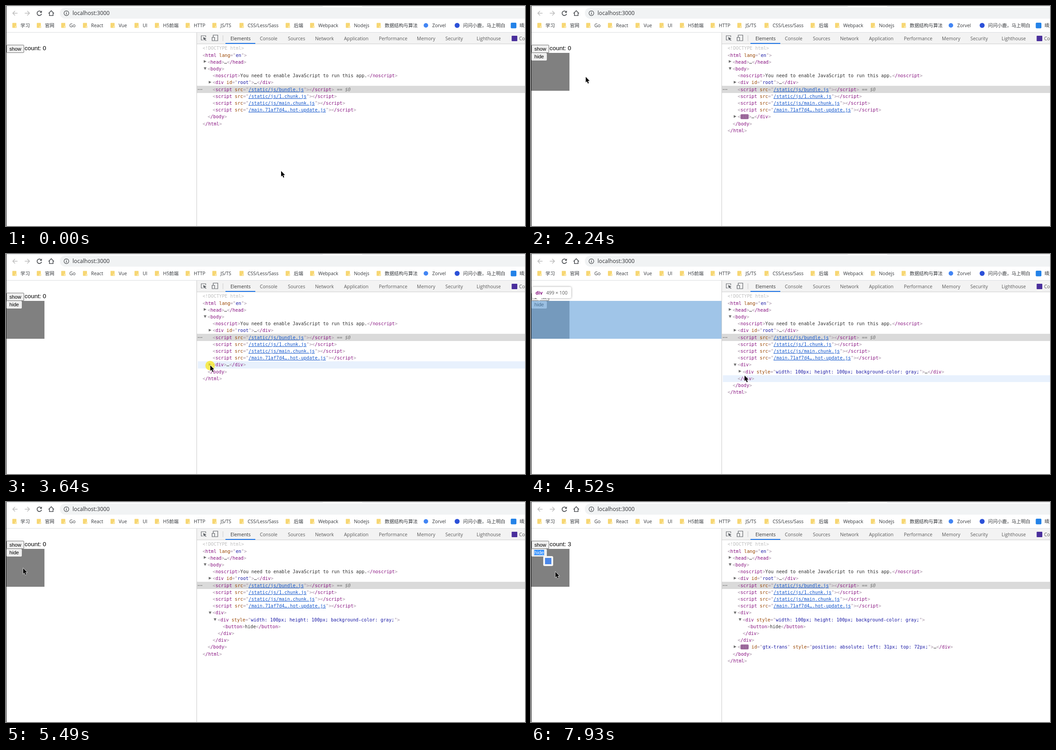
These frames come from a looping animation (1147 by 488 pixels, 8 s). An HTML page:

```html
<!DOCTYPE html>
<html lang="en">
<head>
<meta charset="utf-8">
<title>Portal demo</title>
<style>
html, body { margin: 0; width: 100%; height: 100%; overflow: hidden; background: #fff; }
#stage { position: relative; width: 1147px; height: 488px; overflow: hidden; background: #fff; }
#stage > *, .row, .row > *, #tip > i { position: absolute; }
#chrome { left: 0; top: 0; font: 10.4px "Open Sans", "Noto Sans CJK SC", "Noto Sans CJK", sans-serif; }

#count { left: 41px; top: 86px; font: 13.44px/16px "Liberation Sans", sans-serif; }
#square { left: 1px; top: 103.5px; width: 84px; height: 84px; background: #808080; }
.button { left: 1px; box-sizing: border-box; text-align: center; background: #efefef; color: #000;
  border: 1px solid #767676; border-radius: 2px; font: 11.2px/15px "Liberation Sans", sans-serif; }
#show { top: 86px; width: 39px; height: 18px; line-height: 16px; }
#hide { top: 104px; width: 34px; height: 17px; border-color: #efefef; }
#hide.selected span { background: #3390ff; color: #fff; }
#badge { left: 27px; top: 120px; width: 22px; height: 22px; background: #f5f5f5; border-radius: 3px; }
#badge::before { content: ""; position: absolute; inset: 4px; background: #4a86e8; }

#margin { left: 1px; top: 59px; width: 420px; height: 27px; background: rgba(246,178,107,.66); }
#content { left: 1px; background: rgba(111,168,220,.66); }
#tip { left: 2px; height: 25px; padding: 0 8px; background: #fff; border-radius: 3px; white-space: pre;
  box-shadow: 0 0 4px rgba(0,0,0,.4); font: 10.4px/26px "Open Sans", sans-serif; color: #5a5a5a; }
#tip b { color: #881280; margin-right: 8px; }
#tip > i { left: 10px; border: 6px solid transparent; }
#tip.below > i { top: -12px; border-bottom-color: #fff; }
#tip.above > i { top: 25px; border-top-color: #fff; }

#tree { left: 422px; top: 86.4px; width: 725px; white-space: pre;
  font: 10.13px/15.2px "DejaVu Sans Mono", monospace; color: #a894a6; }
.row { left: 2px; right: 0; height: 15.2px; }
.row.hover { background: #e8f1fd; }
.row.selected { left: 0; background: #dadada; margin-top: -1px; padding-top: 1px; height: 15px; }
.t { color: #881280; }
.n { color: #994500; }
.v { color: #1a1aa6; }
.l { color: #1155cc; text-decoration: underline; }
.x { color: #303030; }
.d { color: #c0c0c0; }
.eq { color: #777; font-style: italic; }
#flash { border-radius: 2px; }
.arrow { border: 3.5px solid transparent; }
.closed { border-left: 6px solid #6e6e6e; border-right: 0; top: 3.6px; }
.opened { border-top: 6px solid #6e6e6e; border-bottom: 0; top: 4.4px; }

#halo { width: 21px; height: 21px; margin: -10px 0 0 -11px; border-radius: 50%; background: rgba(250,232,20,.72); }
#cursor { left: -.3px; top: -.3px; overflow: visible; }
</style>
</head>
<body>
<div id="stage">
  <div id="count"></div>
  <div id="square"></div>
  <div id="show" class="button">show</div>
  <div id="hide" class="button"><span>hide</span></div>
  <div id="badge"></div>
  <div id="margin"></div>
  <div id="content"></div>
  <div id="tip"><i></i><b></b><span></span></div>
  <svg id="chrome" width="1147" height="488"></svg>
  <div id="tree"></div>
  <div id="halo"></div>
  <svg id="cursor" width="10" height="16"><path d="M0 0V12.2L2.7 9.8 4.8 14.8 6.9 13.8 4.8 9H8.6Z" stroke="#fff" stroke-width="1.2" paint-order="stroke"/></svg>
</div>
<script>
const $ = id => document.getElementById(id);
const LOOP = 8000;

// ---- browser chrome ----
const rect = (x, y, w, h, fill, more = '') => `<rect x="${x}" y="${y}" width="${w}" height="${h}" fill="${fill}" ${more}/>`;
const stroke = (d, color, width = 1.5) => `<path d="${d}" fill="none" stroke="${color}" stroke-width="${width}"/>`;
const label = (x, y, text, fill, more = '') => `<text x="${x}" y="${y}" fill="${fill}" ${more}>${text}</text>`;
const folder = x => rect(x + 1, 37.5, 9, 11, '#f7d774', 'rx="1"') + rect(x + 7, 44, 4, 4.5, '#fbe7a6');

const folders = [[13, '学习'], [67, '官网'], [121, 'Go'], [169, 'React'], [230, 'Vue'], [283, 'UI'],
  [328, 'H5前端'], [396, 'HTTP'], [455, 'JS/TS'], [515, 'CSS/Less/Sass'], [617, '后端'],
  [671, 'Webpack'], [750, 'Nodejs'], [818, '数据结构与算法']];
const sites = [[942, 'Zorvel'], [1010, '问问小鹿，马上明白'], [1135, '晴天']];
const tabs = [[496, 'Elements'], [561, 'Console'], [623, 'Sources'], [683, 'Network'], [747, 'Application'],
  [824, 'Performance'], [908, 'Memory'], [971, 'Security'], [1040, 'Lighthouse'], [1134, 'Components']];

$('chrome').innerHTML = [
  rect(0, 0, 700, 1, '#dcdfe3'), rect(787, 0, 360, 1, '#dcdfe3'),
  rect(119, 3.5, 1060, 24.5, '#f1f3f4', 'rx="12"'),
  stroke('M25.5 16H15M20 11l-5 5 5 5', '#bdbdbd'),
  stroke('M41.5 16H52M47 11l5 5-5 5', '#bdbdbd'),
  stroke('M77.5 12.8A5 5 0 1 0 78.6 17.2', '#505357', 1.7),
  '<path d="M79.3 10v5h-5z" fill="#505357"/>',
  stroke('M94 16.5l6-6 6 6M96 15v6.3h8V15', '#505357', 1.6),
  '<circle cx="133.5" cy="16" r="5.3" fill="none" stroke="#505357" stroke-width="1.2"/>',
  rect(132.8, 15, 1.4, 4, '#505357'), rect(132.8, 12.6, 1.4, 1.4, '#505357'),
  label(147, 20.2, 'localhost:3000', '#303236', 'font-size="12.15"'),
  ...folders.map(([x, name]) => folder(x) + label(x + 19, 47.2, name, '#35383c')),
  ...sites.map(([x, name]) => label(x, 47.2, name, '#35383c')),
  '<circle cx="928" cy="43" r="5" fill="#4285f4"/><circle cx="997" cy="43" r="5.5" fill="#2b50d8"/>',
  rect(1115.5, 37, 12.5, 12.5, '#2382e8', 'rx="2"'),
  rect(0, 58, 1147, 1, '#dadce0'),
  rect(421, 59, 726, 25, '#f3f3f3'), rect(421, 83.5, 726, 1, '#cbcbcb'), rect(421, 59, 1, 429, '#cbcbcb'),
  stroke('M435 75.5h-3.5v-9.5h10v3', '#5f6368', 1.1),
  '<path d="M435.5 69l7.5 3-3 1.2 2.8 3-1.2 1.1-2.8-3-1.3 2.7z" fill="#5f6368"/>',
  stroke('M458 69v-4.5h10v12.5h-6M455.5 69.5h5.5v7.5h-5.5z', '#5f6368', 1.2),
  rect(479, 65, 1, 13, '#ccc'),
  ...tabs.map(([x, name], i) => label(x, 75.7, name, i ? '#5a5a5a' : '#333')),
  rect(485, 82, 66, 2, '#1a73e8'),
  rect(1117.5, 66, 12.5, 12, '#4a2f9c', 'rx="1"'),
  rect(0, 0, 1, 488, '#111')
].join('');

// ---- element tree ----
const span = (cls, text) => `<span class="${cls}">${text}</span>`;
const tag = (name, attrs = '') => `&lt;${span('t', name)}${attrs}&gt;`;
const fresh = (name, attrs = '') => `&lt;<span id="flash" class="t">${name}</span>${attrs}&gt;`;
const end = name => tag('/' + name);
const attr = (name, value, cls = 'v') => ` ${span('n', name)}="${span(cls, value)}"`;
const more = span('x', '…');
const script = path => tag('script', attr('src', path, 'l')) + end('script');

// Each row: indent, arrow, markup, hovered node
function portalRows(level) {
  if (!level) return [];
  if (level === 1) return [[2, 'closed', fresh('div') + more + end('div'), 'wrap']];
  const inner = tag('div', attr('style', 'width: 100px; height: 100px; background-color: gray;'));
  const body = level === 2
    ? [[3, 'closed', inner + more + end('div'), 'box']]
    : [[3, 'opened', inner, 'box'],
       [4, '', tag('button') + span('x', 'hide') + end('button')],
       [3, '', end('div'), 'box']];
  return [[2, 'opened', tag('div'), 'wrap'], ...body, [2, '', end('div'), 'wrap']];
}

function treeRows(level, translated) {
  return [
    [0, '', span('d', '&lt;!DOCTYPE html&gt;')],
    [0, '', tag('html', attr('lang', 'en')), 'html'],
    [1, 'closed', tag('head') + more + end('head')],
    [1, 'opened', tag('body'), 'body'],
    [2, '', tag('noscript') + span('x', 'You need to enable JavaScript to run this app.') + end('noscript')],
    [2, 'closed', tag('div', attr('id', 'root')) + more + end('div')],
    [2, '', script('/static/js/bundle.js') + span('eq', ' == $0')],
    [2, '', script('/static/js/1.chunk.js')],
    [2, '', script('/static/js/main.chunk.js')],
    [2, '', script('/main.71af7d4….hot-update.js')],
    ...portalRows(level),
    ...(translated ? [[2, 'closed', fresh('div', attr('id', 'gtx-trans') +
      attr('style', 'position: absolute; left: 31px; top: 72px;')) + more + end('div')]] : []),
    [1, '', end('body'), 'body'],
    [0, '', end('html'), 'html']
  ];
}

function rowHtml([indent, arrow, markup], i, hovered) {
  const selected = i === 6;
  const x = 10.5 + 11.15 * indent + (selected ? 2 : 0);
  const cls = selected ? 'selected' : i === hovered ? 'hover' : '';
  return `<div class="row ${cls}" style="top:${15.2 * i}px">` +
    (selected ? '<span class="x" style="left:0;letter-spacing:-2.4px">···</span>' : '') +
    (arrow ? `<i class="arrow ${arrow}" style="left:${x - 8.5}px"></i>` : '') +
    `<span style="left:${x}px">${markup}</span></div>`;
}

// Highlighted page areas: top, width, height, label, size
const areas = {
  html: [59, 420, 128.5, 'html', '499 × 153'],
  body: [86, 420, 101.5, 'body', '499 × 121'],
  wrap: [103.5, 420, 84, 'div', '499 × 100'],
  box: [103.5, 84, 84, 'div', '100 × 100']
};

// ---- timing ----
// Bursts of screen updates: first, last, count
const bursts = [[0, 0, 1], [70, 70, 1], [230, 1000, 11], [1070, 1870, 10], [1960, 2720, 12], [2790, 3440, 10],
  [3640, 4190, 8], [4520, 5010, 7], [5210, 5490, 5], [6190, 6370, 3], [6830, 6960, 2], [7290, 7490, 3], [7640, 7930, 5]];
const path = [[0, 608, 366], [70, 608, 380], [153, 608, 380], [1000, 48, 116], [1430, 20, 92], [1890, 20, 92],
  [2240, 122, 158], [2640, 450, 269.6], [2720, 446, 258], [2920, 444, 254.3], [3250, 451.5, 247], [3800, 451.5, 247],
  [4190, 478, 281], [4450, 478, 281], [4520, 472, 269.6], [4690, 462, 262], [4930, 462, 262], [5010, 476, 288],
  [5150, 476, 288], [5490, 38, 147], [7570, 38, 147], [7930, 54, 155], [LOOP, 54, 155]];
const clicks = [[1510, 1680], [3640, 3790], [4730, 4880], [6190, 6370], [6830, 6960], [7290, 7490]];
const SHOWN = 1690, TRANSLATED = 7700;
const portalTimes = [SHOWN, 3710, 4800];
const countTimes = [6280, 6960, 7390];
const passed = (times, t) => times.filter(at => t >= at).length;

function lastUpdate(t) {
  const [first, last, count] = bursts.filter(b => b[0] <= t).pop();
  if (count === 1) return first;
  const step = (last - first) / (count - 1);
  return Math.min(last, first + Math.floor((t - first) / step + 1e-6) * step);
}

function pointer(t) {
  const i = path.findIndex(p => p[0] > t);
  const [t0, x0, y0] = path[i - 1], [t1, x1, y1] = path[i];
  const k = (t - t0) / (t1 - t0);
  return [x0 + (x1 - x0) * k, y0 + (y1 - y0) * k];
}

const toggle = (id, on) => { $(id).style.display = on ? '' : 'none'; };

function drawHighlight(node) {
  const area = areas[node];
  toggle('content', area);
  toggle('tip', area);
  toggle('margin', node === 'body');
  if (!area) return;
  const [top, width, height, name, size] = area;
  Object.assign($('content').style, { top: top + 'px', width: width + 'px', height: height + 'px' });
  const above = top > 100;
  $('tip').className = above ? 'above' : 'below';
  $('tip').style.top = (above ? 72.5 : 194) + 'px';
  $('tip').querySelector('b').textContent = name;
  $('tip').querySelector('span').textContent = size;
}

function drawFlash(age) {
  const flash = $('flash');
  if (!flash || age > 1400) return;
  const fade = 100 * Math.min(1, Math.max(0, (age - 560) / 600));
  flash.style.background = `color-mix(in srgb, #d0cad0 ${fade}%, #a06ea0)`;
  flash.style.color = `color-mix(in srgb, #7a2c74 ${fade}%, #8c5c8b)`;
}

function draw(t) {
  const [x, y] = pointer(t);
  const level = passed(portalTimes, t), count = passed(countTimes, t);
  const translated = t >= TRANSLATED;
  const rows = treeRows(level, translated);
  const hovered = x > 424 ? Math.floor((y - 86.4) / 15.2) : -1;
  $('tree').innerHTML = rows.map((row, i) => rowHtml(row, i, hovered)).join('');
  drawFlash(t - (translated ? TRANSLATED : SHOWN));
  const suppressed = t >= 3440 && t < portalTimes[1];
  drawHighlight(!suppressed && rows[hovered] ? rows[hovered][3] : '');

  $('count').textContent = 'count: ' + count;
  toggle('square', level);
  toggle('hide', level);
  $('hide').classList.toggle('selected', count === 3);
  toggle('badge', t >= 7490);
  toggle('halo', clicks.some(([from, to]) => t >= from && t < to));
  for (const id of ['halo', 'cursor']) $(id).style.transform = `translate(${x}px, ${y}px)`;
}

let origin, drawn;
function frame(now) {
  origin ??= now;
  const t = lastUpdate((now - origin) % LOOP);
  if (t !== drawn) draw(drawn = t);
  requestAnimationFrame(frame);
}
draw(drawn = 0);
requestAnimationFrame(frame);
</script>
</body>
</html>
```
